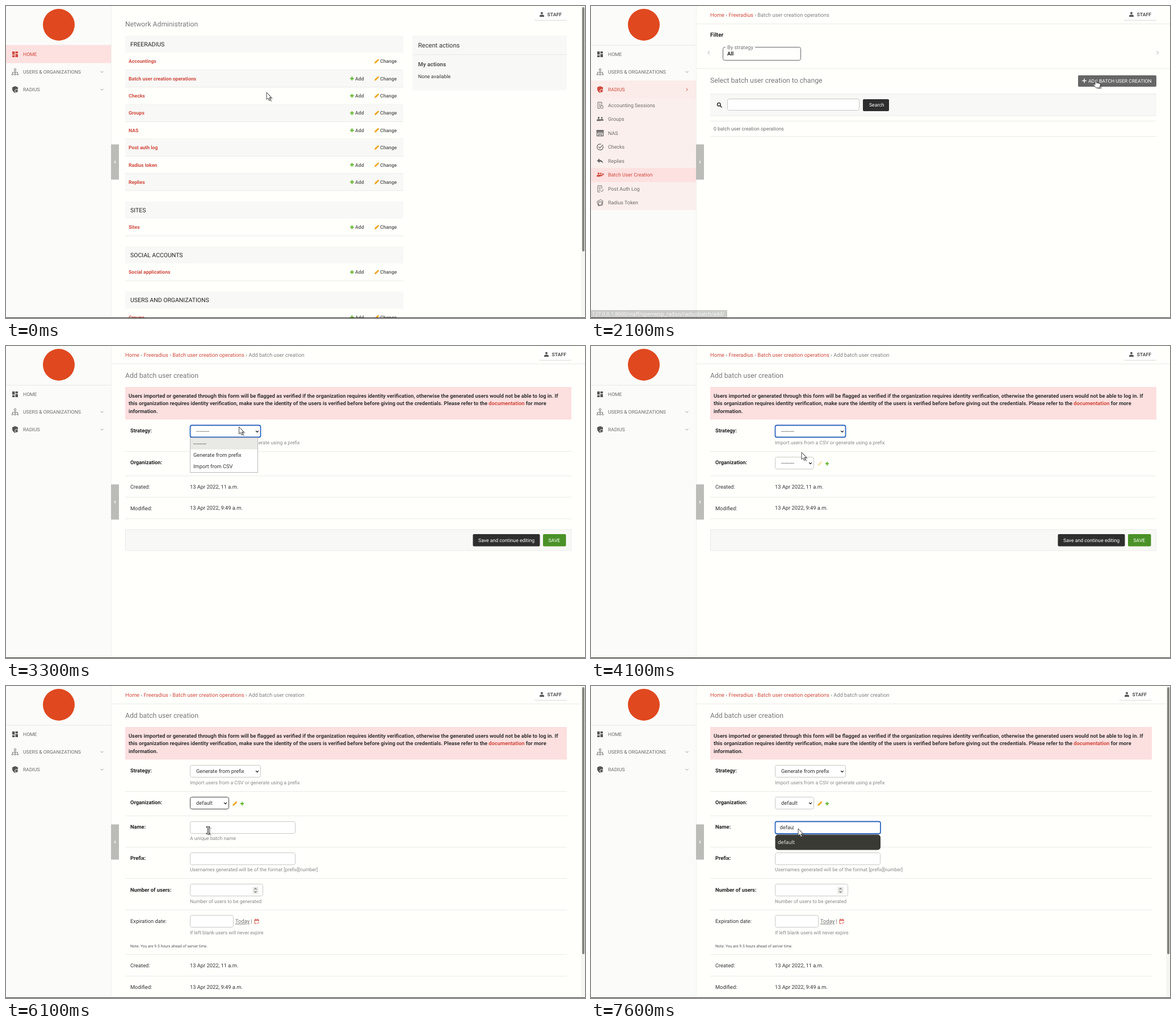
Recreate the animation shown at these times as an HTML page. Size 1020 by 549 pixels, loop 8000 ms.

```html
<!DOCTYPE html>
<html lang="en">
<head>
<meta charset="utf-8">
<title>Batch user creation</title>
<style>
html, body { margin: 0; width: 100%; height: 100%; overflow: hidden; background: #fffffc; }
svg { display: block; width: 1020px; height: 549px; font-family: Roboto, sans-serif; text-rendering: geometricPrecision; }
.sys { font-family: "Open Sans", "Noto Sans", sans-serif; }
</style>
</head>
<body>
<svg id="stage" viewBox="0 0 1020 549"></svg>
<script>
const LOOP = 8000, STEP = 100;
const RED = '#cf4a3e', GREY = '#6c6c6a', DARK = '#333', PALE = '#f8f8f6', LINE = '#eaeae7', ROSE = '#fde0e0';
const stage = document.getElementById('stage');
const clamp = v => Math.max(0, Math.min(1, v));

// y is the middle of the capital letters
const text = (x, y, s, size = 8.65, fill = GREY, weight = 400, more = '') =>
  `<text x="${x}" y="${y + size * .36}" font-size="${size}" fill="${fill}" font-weight="${weight}" ${more}>${s}</text>`;
const bold = (x, y, s, size = 8.65, fill = GREY) => text(x, y, s, size, fill, 700);
const title = (y, s) => text(210, y, s, 12.2, '#777');
const rect = (x, y, w, h, fill, r = 0, more = '') =>
  `<rect x="${x}" y="${y}" width="${w}" height="${h}" rx="${r}" fill="${fill}" ${more}/>`;
const path = (d, stroke, width = 1, fill = 'none') =>
  `<path d="${d}" fill="${fill}" stroke="${stroke}" stroke-width="${width}" stroke-linejoin="round"/>`;
const shape = (d, fill) => `<path d="${d}" fill="${fill}"/>`;
const at = (x, y, s) => `<g transform="translate(${x} ${y})">${s}</g>`;
const rule = (x1, x2, y) => rect(x1, y, x2 - x1, 1, LINE);
const field = (x, y, w, h, stroke = '#c8c8c5') =>
  rect(x + .5, y + .5, w - 1, h - 1, '#fff', 3, `stroke="${stroke}"`);
const ring = (x, y, w, h) => rect(x, y, w, h, '#fff', 3, 'stroke="#2f66bf" stroke-width="1.8"');
const chevron = (x, y, dir, stroke, s = 2.5, width = 1) => {
  const turn = { right: 0, down: 90, left: 180 }[dir];
  return `<g transform="translate(${x} ${y}) rotate(${turn})">${path(`M${-s / 2} ${-s}L${s / 2} 0L${-s / 2} ${s}`, stroke, width)}</g>`;
};
const plus = (x, y, fill, r = 3.5, w = 1.2) => rect(x - r, y - w / 2, 2 * r, w, fill) + rect(x - w / 2, y - r, w, 2 * r, fill);
const pencil = (x, y, fill = '#edaa2c') => at(x, y, shape('M-4 4L-3.3 1L1.8 -3.6Q3 -4.5 4 -3.2Q4.6 -2.4 3.7 -1.6L-1 3.2Z', fill));

const person = (x, y, c, r = 4) => `<circle cx="${x}" cy="${y}" r="${r / 2}" fill="${c}"/>` +
  shape(`M${x - r} ${y + r * 1.65}v${-r * .35}q0 ${-r * .6} ${r} ${-r * .6}t${r} ${r * .6}v${r * .35}z`, c);
const page = c => path('M-4 -5.5H3V0M-4 -5.5V5.5H0M-2 -2.5H1M-2 0H1M-2 2.5H0', c, .9);
const icons = {
  home: c => rect(-5, -5, 4.4, 5.5, c) + rect(.6, -5, 4.4, 3.3, c) + rect(-5, 1.7, 4.4, 3.3, c) + rect(.6, -.5, 4.4, 5.5, c),
  orgs: c => `<circle cy="-4" r="1.7" fill="none" stroke="${c}" stroke-width=".9"/>` + path('M0 -2V1M-4.5 3V.5H4.5V3M0 0V3', c, .8) +
    [-4.5, 0, 4.5].map(x => `<circle cx="${x}" cy="4.3" r="1.3" fill="none" stroke="${c}" stroke-width=".9"/>`).join(''),
  shield: c => shape('M-5 -4L0 -6L5 -4V0Q4 4 0 6Q-4 4 -5 0Z', c) +
    `<circle cx="2.5" cy="2.5" r="2.8" fill="${c}" stroke="#fbf5f2"/>`,
  log: c => page(c) + `<circle cx="3" cy="3" r="2.5" fill="none" stroke="${c}"/>`,
  group: c => person(3, -2.5, c, 3) + person(-2.5, -2.5, c, 3.4),
  nas: c => rect(-6.5, -5.5, 13, 3.5, c, 1) + path('M-5.5 -2V5H5.5V-2M-6 -.5H6M-2.5 5V2H2.5V5', c, 1.3),
  check: c => path('M5 -2A5.3 5.3 0 1 1 2 -5M-2.5 -.5L-.5 2L5 -4', c, 1.2),
  reply: c => shape('M-5.5 -.5L-1 -4.5V-2Q4.5 -1.5 5.5 4Q3 1 -1 1V3.5Z', c),
  batch: c => person(1.2, -2.5, c, 2.8) + person(-2.7, -2.5, c, 3.4) + plus(5, -1, c, 2),
  auth: c => page(c) + path('M1 3L3 5L6 1', c),
  token: c => path('M-5.5 -2L1 -5.5L5 -3L4 4L-3 5.5Z', c) + path('M-2.5 -1.5H3V4H-2.5Z', c)
};
const icon = (name, y, c = '#666') => at(16, y, icons[name](c));

const submenu = [['log', 'Accounting Sessions'], ['group', 'Groups'], ['nas', 'NAS'], ['check', 'Checks'],
  ['reply', 'Replies'], ['batch', 'Batch User Creation'], ['auth', 'Post Auth Log'], ['token', 'Radius Token']];

function sidebar(active, settle, handle) {
  const open = active === 'radius', home = active === 'home';
  let s = rect(0, 0, 185, 549, '#fbfcf9') + rect(185, 0, 1, 549, '#f0f0ed') + rule(0, 185, 68.5) +
    '<circle cx="93" cy="33" r="28" fill="#e0481f"/>';
  if (home) s += rect(0, 69, 185, 31.5, ROSE);
  if (open) s += rect(0, 131, 185, 31, '#fbebe9') + rect(0, 162, 185, 197, '#faefec');
  s += icon('home', 85, home ? RED : '#555') + text(30, 85, 'HOME', 8.65, home ? RED : GREY) +
    icon('orgs', 116) + text(30, 116, 'USERS &amp; ORGANIZATIONS') + chevron(169, 116, 'down', '#999') +
    icon('shield', 147, open ? RED : '#555') + text(30, 147, 'RADIUS', 8.65, open ? RED : GREY) +
    chevron(169, 147, open ? 'right' : 'down', open ? RED : '#999');
  if (open) submenu.forEach(([name, label], i) => {
    const y = 174.7 + 24.5 * i, batch = name === 'batch';
    if (batch) s += rect(0, y - 12, 185, 24.5, ROSE, 0, `opacity="${settle}"`);
    s += icon(name, y, batch ? RED : '#666') + text(30, y, label, 8.9, batch && settle > .5 ? RED : GREY);
  });
  return s + rect(185, 243.5, 14, 62, '#bbbbb8') + chevron(192, 274.5, handle, '#fff', 2, 1.1);
}

function header(right) {
  return rect(right - 57, 6, 57, 20, '#e4e4e1', 2) + rect(right - 57, 4.5, 57, 20, '#fff', 2) +
    person(right - 44, 12.5, '#555') + bold(right - 34.5, 15, 'STAFF', 8.65, '#555');
}

const scrollbar = bottom => rect(1013, 0, 7, 549, '#f5f5f2') + rect(1015, 2, 4, bottom - 2, '#85857f', 2);

function crumbs(parts) {
  const spans = parts.map((p, i) => i < parts.length - 1 ? `<tspan fill="${RED}">${p}</tspan> › ` : p);
  return text(210, 15.5, spans.join(''), 9.3, '#808080') + rule(186, 1020, 31);
}

const modules = [
  [52, 'FREERADIUS', ['Accountings', 'Batch user creation operations', 'Checks', 'Groups', 'NAS', 'Post auth log', 'Radius token', 'Replies']],
  [344, 'SITES', ['Sites']],
  [423, 'SOCIAL ACCOUNTS', ['Social applications']],
  [502.5, 'USERS AND ORGANIZATIONS', ['Groups']]
];
const readOnly = ['Accountings', 'Post auth log'];

function homePage() {
  let s = title(32, 'Network Administration');
  for (const [top, caption, rows] of modules) {
    s += rect(210, top, 490, 30, PALE) + text(219, top + 15.2, caption, 10.5, '#222');
    rows.forEach((name, i) => {
      const y = top + 45.3 + 30.35 * i;
      if (i % 2) s += rect(210, y - 15, 490, 30, PALE);
      s += rule(210, 700, y + 14.7) + bold(216, y, name, 8.65, RED) + pencil(653, y) + bold(659, y, 'Change');
      if (!readOnly.includes(name)) s += plus(609.5, y, '#62b52c', 3.3, 2) + bold(615, y, 'Add');
    });
  }
  return s + rect(716, 52, 272, 96.5, PALE) + rule(716, 988, 85) + text(726, 69, 'Recent actions', 11.1, DARK) +
    bold(726, 102, 'My actions', 9.96, '#555') + text(726, 123.5, 'None available', 8.75, DARK) + header(988) + scrollbar(432);
}

function listPage(t, settle) {
  const focus = t < 2000, arrow = settle > .9 ? '#ccc' : settle > .4 ? '#888' : '#222';
  return crumbs(['Home', 'Freeradius', 'Batch user creation operations']) + header(996) +
    bold(210, 50.5, 'Filter', 10, '#222') + chevron(207.5, 82, 'left', arrow, 3, 1.4) + chevron(998, 82, 'right', arrow, 3, 1.4) +
    rect(232.5, 72.5, 137, 23, '#fffffc', 3, 'stroke="#666"') + rect(237, 71, 52, 3, '#fffffc') +
    text(240, 72.5, 'By strategy', 9.3, '#777') + bold(240, 84, 'All', 9.3, '#222') + rule(186, 1020, 109.5) +
    title(131, 'Select batch user creation to change') +
    rect(858, 122, 138, 20, t >= 1900 ? '#666' : DARK, 2) + plus(869, 131.5, '#fff', 3.8, 1.4) +
    text(876, 131.5, 'ADD BATCH USER CREATION', 8.6, '#fff') +
    rect(210, 154.5, 786, 38.5, PALE) + rule(210, 996, 154.5) + rule(210, 996, 192.5) +
    '<circle cx="225.3" cy="173.2" r="2.8" fill="none" stroke="#333" stroke-width="1.5"/>' + path('M227.5 175.5L230.5 178.5', DARK, 1.7) +
    (focus ? ring(240, 163, 233.5, 21.5) : field(240, 163, 233, 21)) +
    (focus && t < 1500 ? rect(248, 168, 1, 11, '#222') : '') +
    rect(479, 164, 46, 21, '#2e2e2e', 2) + text(490, 174, 'Search', 8.65, '#fff') +
    rule(210, 996, 202) + text(216, 215.7, '0 batch user creation operations') + rule(210, 996, 229);
}

function select(x, y, w, h, value, focus, stroke) {
  return (focus ? ring(x + .5, y + .5, w - 1, h - 1) : field(x, y, w, h, stroke)) +
    text(x + 11, y + h / 2, value, 9.3, DARK) + chevron(x + w - 6.5, y + h / 2 + .3, 'down', '#222', 2.4, 1.3);
}
const menu = (x, y, w, h, items, hover) => rect(x + .5, y + .5, w - 1, h - 1, '#fff', 0, 'stroke="#bbb"') +
  items.map((item, i) => {
    const row = (h - 2) / items.length, top = y + 1 + row * i;
    return (i === hover ? rect(x + 1, top, w - 2, row, '#e9e9e6') : '') + text(x + 6, top + row / 2, item, 9.3, DARK);
  }).join('');

const label = (y, s) => bold(219, y, s, 9.3, '#222');
const plain = (y, s, value = '') => text(219, y, s, 9.3, DARK) + text(324, y - .5, value, 9.3, DARK);
const help = (y, s) => text(324, y, s, 8.65, '#888');
const DASHES = '---------';

function nameField(t) {
  const typed = 'defau'.slice(0, [7100, 7200, 7400, 7500, 7600].filter(key => t >= key).length);
  const focus = t >= 6200;
  let s = focus ? ring(324.5, 238.5, 185.5, 21.5) : field(324, 238, 186, 22);
  s += text(332.5, 249, typed + (focus ? '<tspan dx="-.6" font-weight="300">|</tspan>' : ''), 9.3, DARK);
  if (typed) {
    const hints = ['default', 'demo', 'devices'].filter(h => h.startsWith(typed) || typed.length < 3);
    s += rect(324.5, 261.5, 185.5, 1.5 + 25.5 * hints.length, '#3a3a35', 5) +
      hints.map((h, i) => text(329, 275 + 25.5 * i, h, 9.1, '#f4f4f0', 400, 'class="sys"')).join('');
  }
  return s;
}

function formPage(t) {
  const grown = t >= 4300, right = grown ? 988 : 996, chosen = t >= 5800;
  const lines = [
    'Users imported or generated through this form will be flagged as verified if the organization requires identity verification, otherwise the generated users would not be able to log in. If',
    `this organization requires identity verification, make sure the identity of the users is verified before before giving out the credentials. Please refer to the <tspan fill="${RED}">documentation</tspan> for more`,
    'information.'
  ];
  let s = crumbs(['Home', 'Freeradius', 'Batch user creation operations', 'Add batch user creation']) + header(right) +
    title(52, 'Add batch user creation') + rect(210, 72, right - 210, 57.5, '#fcdfdf') +
    lines.map((l, i) => bold(216, 88 + 13.1 * i, l, 9.3, DARK)).join('') +
    label(149, 'Strategy:') + select(324, 139, 125, 22, grown ? 'Generate from prefix' : DASHES, !grown) +
    help(170, 'Import users from a CSV or generate using a prefix') + rule(210, right, 185) +
    label(205, 'Organization:') +
    select(324, 195, 69, 22, chosen ? 'default' : DASHES, false, t >= 5000 && t < 6200 ? '#444' : undefined) +
    pencil(403, 207, chosen ? '#edaa2c' : '#f7e3b4') + plus(416, 207, '#62b52c', 3.2, 1.8) + rule(210, right, 228);
  if (!grown) {
    s += plain(248, 'Created:', '13 Apr 2022, 11 a.m.') + rule(210, right, 265.5) +
      plain(285.5, 'Modified:', '13 Apr 2022, 9:49 a.m.') + rule(210, right, 303.5) +
      rect(210.5, 323, right - 211, 37, PALE, 0, `stroke="${LINE}"`) +
      rect(822.5, 331, 118, 21.5, '#2e2e2e', 2) + text(832, 341.5, 'Save and continue editing', 8.7, '#fff') +
      rect(946, 331, 40.5, 21.5, '#4a9127', 2) + text(955.5, 341.5, 'SAVE', 8.65, '#fff');
    if (t >= 3300 && t < 4100) s += menu(324, 161, 120, 62, [DASHES, 'Generate from prefix', 'Import from CSV'], t >= 3700 ? 1 : 0);
    return s;
  }
  s += label(248, 'Name:') + help(268, 'A unique batch name') + rule(210, right, 283) +
    label(303, 'Prefix:') + field(324, 293, 186, 22) + help(323, 'Usernames generated will be of the format [prefix][number]') + rule(210, right, 338) +
    label(358.5, 'Number of users:') + field(324, 348, 129, 22) + rect(434.5, 353.5, 10, 12, '#e6e6e3', 1) +
    path('M437.5 358L439.5 355.8L441.5 358M437.5 361L439.5 363.2L441.5 361', GREY, 1.1) +
    help(378.5, 'Number of users to be generated') + rule(210, right, 393.5) +
    plain(413.5, 'Expiration date:') + field(324, 403, 77, 22) +
    text(404, 414, '<tspan text-decoration="underline">Today</tspan> |', 9.3) +
    path('M438 418H441M438 418V411H445V414M438 412.5H445M439.8 409.5V411M443.3 409.5V411M442 417L443.2 418.2L446 415', RED, 1) +
    help(433.5, 'If left blank users will never expire') +
    text(219, 458, 'Note: You are 9.5 hours ahead of server time.', 6.8, '#555') + rule(210, right, 472) +
    plain(492, 'Created:', '13 Apr 2022, 11 a.m.') + rule(210, right, 510) + plain(530, 'Modified:', '13 Apr 2022, 9:49 a.m.') +
    nameField(t) + scrollbar(472);
  if (t >= 5000 && t < 5700) s += menu(324, 217, 64, 54, [DASHES, 'default'], t >= 5300 ? 1 : 0);
  return s;
}

function bubble(t) {
  const url = '127.0.0.1:8000/staff/openwisp_radius/radiusbatch/';
  const show = (s, w, o) => `<g opacity="${o}">${rect(0, 535, w, 14, '#1f1f1c', 1)}</g>` +
    text(2, 542, s, 9, '#fff', 400, 'class="sys"');
  if (t >= 400 && t < 700) return show(url, 222, clamp((t - 300) / 300));
  if (t >= 700 && t < 1100) return show('Waiting for 127.0.0.1…', 199, t < 1000 ? 1 : .4);
  if (t >= 2100 && t < 2500) return show(url + 'add/', 240, clamp((t - 2000) / 450));
  return '';
}

// time, x, y of the pointer tip
const track = [[0, 459, 152], [400, 314, 129], [900, 314, 129], [1100, 537, 168], [1200, 537, 168], [1300, 565, 161],
  [1400, 565, 161], [2000, 888, 129], [2300, 888, 129], [2600, 541, 175], [2700, 541, 175], [3100, 432, 126], [3400, 403, 148],
  [3600, 403, 148], [3800, 371, 185], [4000, 371, 185], [4100, 371, 187], [4200, 371, 187], [4600, 366, 205], [4900, 366, 205],
  [5400, 352, 246], [5600, 352, 246], [5800, 356, 254], [6100, 356, 254], [6300, 365, 254], [6400, 365, 254], [6500, 365, 251], [LOOP, 365, 251]];
const pointers = {
  arrow: 'M0 0V12.5L2.8 10L4.8 14.5L6.8 13.5L4.8 9.3H8.5Z',
  hand: 'M0 1Q0 0 1 0T2.2 1V6L8 7.2Q9.5 7.6 9.3 9.5L8.4 15H1.8L-3 9.5Q-3.4 8 -1.8 8.2L0 9.5Z',
  beam: 'M-3 -6.5H3V-5H1V5H3V6.5H-3V5H-1V-5H-3Z'
};
function pointer(t) {
  const i = Math.max(1, track.findIndex(k => k[0] >= t));
  const [t0, x0, y0] = track[i - 1], [t1, x1, y1] = track[i];
  const u = clamp((t - t0) / (t1 - t0)), e = u * u * (3 - 2 * u);
  const kind = (t >= 400 && t < 1000) || (t >= 1900 && t < 2400) ? 'hand' : t >= 5800 && t < 6500 ? 'beam' : 'arrow';
  const d = pointers[kind];
  return at(x0 + (x1 - x0) * e, y0 + (y1 - y0) * e,
    `<g transform="translate(3 2)" opacity=".45">${shape(d, '#555')}</g>` + path(d, '#333', .9, '#fff'));
}

function render(t) {
  const settle = clamp((t - 900) / 200);
  const active = t < 800 ? 'home' : t < 2400 ? 'radius' : '';
  const loading = (t >= 800 && t < 1000) || (t >= 2400 && t < 2800);
  const body = t < 800 ? homePage() : t < 2400 ? listPage(t, settle) : formPage(t);
  stage.innerHTML = rect(0, 0, 1020, 549, '#fffffc') + body + sidebar(active, settle, loading ? 'right' : 'left') +
    bubble(t) + rect(0, 548, 1020, 1, '#3c3530') + pointer(t);
}

let last = -1;
function tick() {
  const t = Math.floor(performance.now() % LOOP / STEP) * STEP;
  if (t !== last) render(last = t);
  requestAnimationFrame(tick);
}
tick();
</script>
</body>
</html>
```
